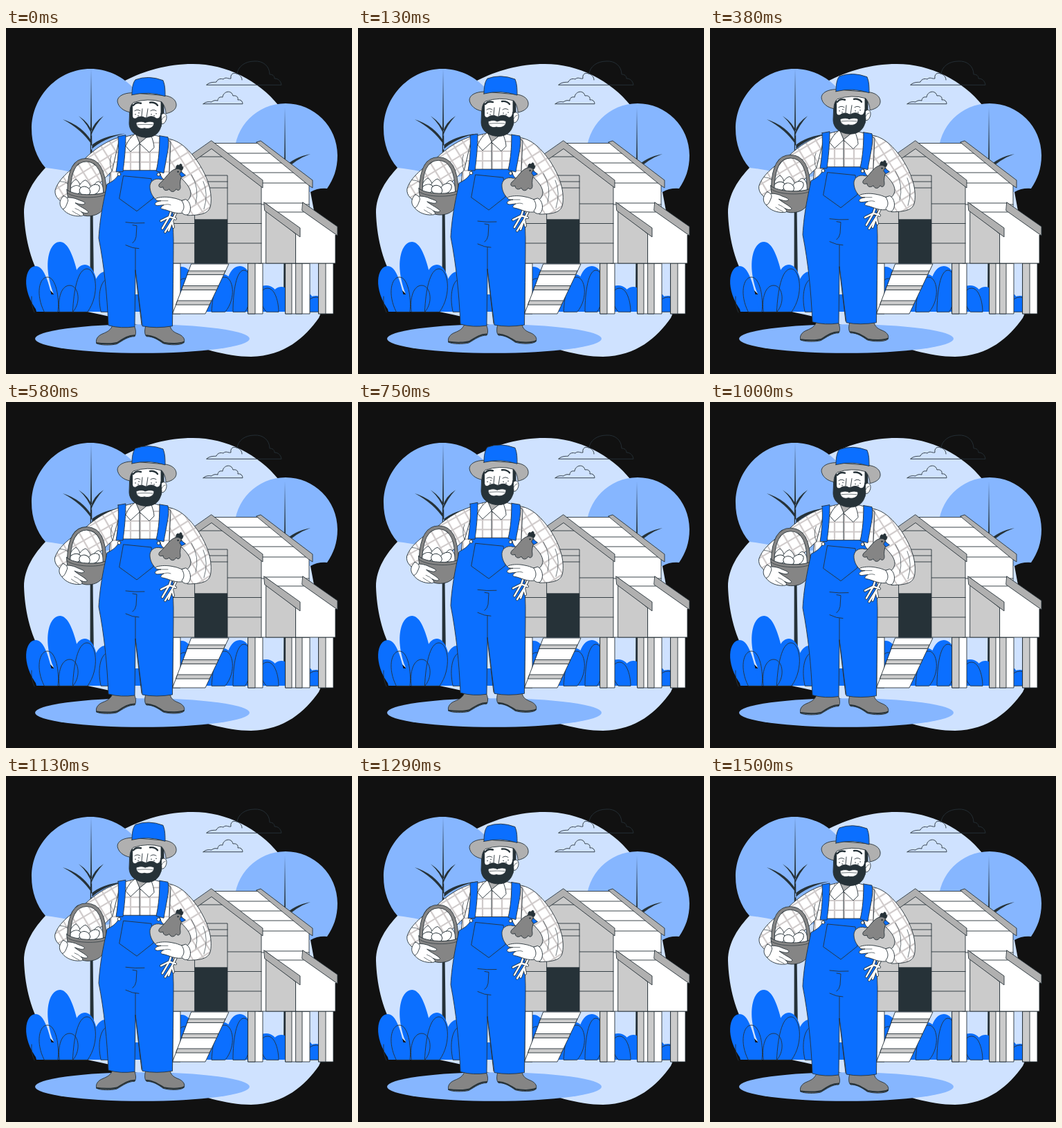
These frames come from a looping animation (500x500 px, 1540 ms). An HTML page:

```html
<!DOCTYPE html>
<html lang="en">
<head>
<meta charset="utf-8">
<title>Farmer</title>
<style>
  html, body { margin: 0; width: 100%; height: 100%; overflow: hidden; background: #111; }
  svg { display: block; width: 100vw; height: 100vh; }
  .o { stroke: #263238; stroke-width: .9; stroke-linejoin: round; stroke-linecap: round; }
  .n { fill: none; }
  .w { fill: #fff; }
  .b { fill: #0b6fff; }
  .m { fill: #86b6ff; }
  .g { fill: #cbcbcb; }
  .h { fill: #b0b0b0; }
  .s { fill: #858585; }
  .d { fill: #263238; }
  .thin { stroke-width: .65; }
</style>
</head>
<body>
<svg viewBox="0 0 500 500">
  <defs>
    <pattern id="plaid" width="14" height="14" patternUnits="userSpaceOnUse" x="5" y="5">
      <path d="M0 0H14V14H0Z" class="w"/>
      <path d="M0 7H14M7 0V14" stroke="#cfcaca" stroke-width="2.2"/>
    </pattern>
    <pattern id="plaidL" href="#plaid" patternTransform="rotate(-32)"/>
    <pattern id="plaidR" href="#plaid" patternTransform="rotate(58)"/>
    <path id="feet" d="M239 264L236 273L224 279M236 273L226 290M236 273L245 276M246 267L240 279L230 295M240 279L242 288M240 279L235 293"/>
    <path id="handle" d="M91 237C91 206 100 191 116 191C134 191 142 209 143 238"/>
  </defs>
  <path d="M0 0H500V500H0Z" fill="#111"/>

  <path fill="#cfe2ff" d="M57 202C42 218 26 240 26 267C27 298 34 335 52 364C72 394 98 406 122 411C160 418 200 431 240 447C278 462 318 475 354 475C403 474 432 447 452 419C464 398 464 330 448 280L440 237L448 200C430 165 412 137 394 112C365 76 319 52 270 52C232 52 200 62 172 76Z"/>

  <g id="trees">
    <path class="m" d="M122 59C168 59 207 98 207 145S168 222 122 214C100 210 80 204 57 202C44 187 37 167 37 146C37 98 76 59 122 59Z"/>
    <path class="m" d="M330 184C330 142 363 109 404 109S479 142 479 184C479 204 473 219 464 232Q450 231 440 237H330Z"/>
    <path class="d" d="M123 59L124.300 165L127.500 410H121.500L121.800 165Z M82 132Q110 141 124 164V169Q110 147 82 132Z M105 127Q121 138 124 150V156Q120 141 105 127Z M141 127Q126 137 123 150V156Q128 141 141 127Z M172 152.500Q139 156 123 170V176Q139 160 172 152.500Z"/>
    <path class="d" d="M403 115L404.200 205L405.500 410H401L402 205Z M440 182Q415 187 403 201V206Q418 190 440 182Z M374 178Q395 187 403 200V206Q393 189 374 178Z"/>
  </g>

  <g class="o n">
    <path d="M290 82.300H398C397 76 393 73 388 73C388 69 385 67 381 67C381 55 371 47 359 48C345 48 335 56 334 66M290 82C296 77 301 79 304 78C306 73 311 73 314 74C318 70 321 74 325 73C324 67 328 64 333 66C338 67 341 71 341 75"/>
    <path d="M285 109.700H342C342 106 339 103 335 104C336 100 333 97 328 98C326 89 314 91 313 100C309 99 306 101 306 105C302 104 299 105 297 107C292 106 288 107 285 109.700"/>
  </g>

  <g id="bush"></g>

  <g id="coop" class="o">
    <path class="w" d="M238 340H252V413H238Z"/><path class="g" d="M236 340H241V413H236Z"/>
    <path class="w" d="M350 340H371V413H350Z"/><path class="g" d="M350 340H360V413H350Z"/>
    <path class="w" d="M404 340H439V413H404Z"/><path class="g" d="M404 340H413V413H404ZM419 340H428V413H419Z"/>
    <path class="w" d="M452 340H473V413H452Z"/><path class="g" d="M452 340H462V413H452Z"/>
    <path class="w" d="M268 341H322L288 413H241Z"/>
    <path class="g" d="M264 351H317L314.500 356.500H262ZM256 372.500H307L304.500 378.500H254ZM248 394H297L294 400H246Z"/>
    <path class="w" d="M365 222H438V340H365Z"/><path class="n" d="M369 255H438"/>
    <path class="g" d="M230 216L297 170L369 224V340H230Z"/>
    <path class="n" d="M320 254H369M320 282.500H369M320 311H369M230 282.500H273M230 311H273M230 254H273M277 186H320"/>
    <path class="g" d="M273 213H320V277H273Z"/><path class="n" d="M273 222H320M273 231H320"/>
    <path class="d" d="M273 277H320V340H273Z"/>
    <path class="w" d="M297 166.500H366L441 224H371Z"/>
    <path class="n" d="M315 181H386M333 195H404M352 209H423"/>
    <path class="h" d="M362 165L368 163L443 220V231L437 227Z"/>
    <path class="h" d="M297 163L371 220V231L297 174.500L230 221V210Z"/>
    <path class="g" d="M376 262L419 298V340H376Z"/>
    <path class="w" d="M419 293H476V340H419Z"/>
    <path class="w" d="M375 253H430L478 289L425 291Z"/>
    <path class="w" d="M398 268L428 262L478 299H425V288Z" stroke="none"/>
    <path class="n" d="M392 266H430"/>
    <path class="h" d="M429 252L479 287V300L428 264Z"/>
    <path class="h" d="M373 252L425 289V302L374 264Z"/>
  </g>

  <ellipse class="m" cx="197" cy="449" rx="155" ry="20.800"/>

  <g id="man" class="o">
    <g id="shoes">
      <path class="s" d="M154 430C151 437 147 439 140 442C132 445 129 451 131 456C136 459 152 459 160 457C169 452 176 446 186 446C189 441 187 434 185 430Z"/>
      <path class="s" d="M202 430C200 437 200 443 203 446C213 446 220 451 227 456C236 459 253 459 257 455C260 449 254 444 248 442C241 439 238 436 237 430Z"/>
      <path class="n" style="stroke-width:2" d="M131 455.500C140 457 155 457 161 455C169 450 175 445 186 444.500M203 444.500C213 445 220 450 228 455C237 457 251 457 257 454"/>
    </g>

    <path fill="url(#plaidR)" d="M232 160C252 162 266 178 278 195C290 214 298 234 296 254C295 266 288 271 262 271L240 240L226 210Z"/>
    <path class="n thin" d="M285 222Q293 240 286 262M268 212Q280 232 274 254"/>
    <path fill="url(#plaid)" d="M186 154C174 157 164 159 154 167L149 230H235L238 165C230 158 220 157 211 154Z"/>

    <g id="arm">
      <path fill="url(#plaidL)" d="M164 158C146 163 128 175 113 190C96 203 76 217 71 235C70 245 78 251 90 257L106 240C122 240 138 222 153 207Z"/>
      <path class="n thin" d="M78 222Q92 222 99 235M153 207Q148 195 152 185"/>
      <g class="w">
        <path d="M90 238C92 228 96 221 101 219C106 222 109 230 110 240Z"/>
        <path d="M123 240C125 228 130 222 134 222C140 226 142 233 141 240Z"/>
        <path d="M102 241C102 230 110 221 115 220C121 224 125 232 124 242Z"/>
        <ellipse cx="100" cy="235" rx="9" ry="6.500" transform="rotate(-25 100 235)"/>
        <ellipse cx="127" cy="234" rx="9.500" ry="6.500" transform="rotate(-38 127 234)"/>
        <ellipse cx="114" cy="236" rx="8" ry="6.500" transform="rotate(20 114 236)"/>
      </g>
      <use href="#handle" class="n" style="stroke-width:5.500"/>
      <use href="#handle" class="n" style="stroke:#858585;stroke-width:3.900"/>
      <path class="s" d="M88 234C98 243 135 243 146 236C147 258 139 272 118 272C99 271 89 254 88 234Z"/>
      <path class="n thin" d="M89 239C99 247 136 247 146 240"/>
      <path class="w" d="M82 248C87 244 94 245 101 247C107 250 115 251 114 254C111 257 104 254 100 253C106 258 116 262 119 266C119 269 113 268 109 266C113 269 113 272 108 272C98 273 88 269 83 263C80 258 79 252 82 248Z"/>
      <path class="n thin" d="M100 261Q106 263 109 266M96 265Q102 269 107 271"/>
      <path class="w" d="M83 243C88 244 91 248 89 252C87 258 85 262 82 262C77 257 76 250 83 243Z"/>
    </g>

    <g id="overalls">
      <path class="b" d="M165 206H222C223 216 227 221 238 224C242 258 241 280 242 305C242 350 241 390 240.500 431Q217 435 197 431L187 350L186 432Q166 435 148 430C146 385 142 345 134 304C136 270 142 246 146 226C154 222 162 217 165 206Z"/>
      <path class="n" d="M170 214L210 218L213 246L189 265L164 247ZM173 281Q186 283 200 282M183 285L189 286L188 302Q187 308 183 311M173 314Q183 319 192 319M187 319V352L196 429"/>
      <path class="b" d="M162 157L173 155C173 175 171 192 169 208H159C162 190 163 174 162 157Z"/>
      <path class="b" d="M222 156L234 158C237 170 231 190 228 210L217 207C221 190 222 172 222 156Z"/>
      <circle class="w" cx="163.500" cy="211.500" r="2.300"/><circle class="w" cx="220.500" cy="212" r="2.300"/>
    </g>

    <g id="head">
      <path class="h" d="M188 148H209L208 160L194 169L186 157Z"/>
      <path class="w" d="M187 153C181 157 176 163 173 171L180 179L193 167ZM209 154C212 161 214 168 214 173L207 180L193 167Z"/>
      <path class="n" d="M193 168V206"/>
      <path class="d" d="M179 107H228V126L223 136H180Z"/>
      <path class="w" d="M183 103H224V143Q205 150 183 142Z"/>
      <path class="w" d="M225 125C230 121 234 127 231 134C229 139 225 140 223 138Z"/>
      <path class="n thin" d="M225 133Q227 128 230 128"/>
      <path class="d" d="M179 119L182 122C182 130 184 132 188 131C192 127 199 128 202 131C207 127 213 127 217 131C222 132 223 128 224 123L225 138C223 150 217 158 203 158.500C188 158 178 150 178 138Z"/>
      <path class="w" d="M188 137C193 135 198 135 201 137C206 135 211 135 214 137C214 144 207 147 200 145C194 147 188 144 188 137Z"/>
      <path class="n thin" d="M190 140Q201 139 212 140"/>
      <path class="n" d="M197 117L196 128Q199 131 203 130L205 117M186 120Q190 117 194 120M209 120Q213 117 217 120"/>
      <path class="n" style="stroke-width:2.400" d="M184 112Q188 107 195 109M208 108Q215 107 219 112"/>
      <path class="n" style="stroke-width:1.500" d="M187 125h.1M191 127h.1M192 123h.1M210 125h.1M214 127h.1M217 124h.1"/>
      <path class="h" d="M182 94C170 94 161 99 161 106C162 114 169 120 179 122C179 115 181 111 184 108Q205 101 225 107C229 112 231 118 231 124C241 122 247 117 246 110C245 103 238 99 230 98Z"/>
      <path class="b" d="M182 97C182 88 183 80 187 75Q206 68 227 76C230 83 230 91 230 99Q206 91 182 97Z"/>
    </g>

    <g id="hen">
      <use href="#feet" class="n" style="stroke-width:4"/>
      <use href="#feet" class="n" style="stroke:#fff;stroke-width:2.400"/>
      <path class="g" d="M224 219C214 216 207 223 208 231C209 243 218 254 236 256C252 258 266 252 267 240C267 232 261 225 254 218Z"/>
      <path class="d" d="M246 204C245 199 248 197 250 199C252 195 255 197 254 200C257 201 256 204 254 206Z"/>
      <path class="s" d="M245 204C251 202 256 207 254 213C252 219 251 224 252 230C252 235 248 236 246 233C243 238 238 238 236 233C231 237 227 234 227 230C222 232 219 229 222 225C230 219 236 206 245 204Z"/>
      <path class="b" d="M253 208L259.500 213L254 216L251 212Z"/>
      <circle class="d" cx="248.500" cy="208" r=".8"/>
      <path class="w" d="M262 250C255 252 250 247 242 246C234 244 225 244 218 246C214 248 217 250 224 250C218 251 214 253 216 256C218 258 224 256 228 256C224 258 222 261 226 262C235 263 244 271 260 267Z"/>
      <path class="n thin" d="M228 256Q234 254 238 256M224 250H234"/>
      <path class="w" d="M260 248C267 251 269 264 263 270C258 271 255 269 254 266C259 261 257 254 254 250Z"/>
    </g>
  </g>
</svg>
<script>
  // Leaf rooted on the ground line: centre, width, top, lean.
  const leaf = (x, w, top, lean) => {
    const h = 410 - top, c = x + lean;
    return `M${x - w * .4} 410C${c - w * .8} ${top + h * .5} ${c - w * .55} ${top} ${c} ${top}` +
      `S${c + w * .8} ${top + h * .6} ${x + w * .5} 410Z`;
  };
  const filled = [[57, 28, 344, -14], [97, 36, 309, -19], [114, 30, 342, 0], [134, 28, 352, 10],
    [165, 30, 350, 0], [225, 30, 350, 0], [256, 32, 345, -2], [284, 28, 362, 0], [308, 28, 356, 6],
    [334, 32, 344, 4], [376, 30, 372, 0], [394, 24, 374, 4], [420, 24, 362, 0], [448, 24, 387, 0]];
  const lined = [[64, 22, 360, -4], [86, 22, 372, 6], [106, 24, 348, 11], [146, 22, 362, 3],
    [252, 22, 362, 6], [306, 22, 360, 10], [336, 20, 350, 8], [384, 20, 376, -6], [442, 20, 389, 6]];
  const path = (list, cls) => `<path class="${cls}" d="${list.map(a => leaf(...a)).join('')}"/>`;
  document.getElementById('bush').innerHTML =
    '<path class="b" d="M44 410L38 385H440L460 410Z"/>' + path(filled, 'b') + path(lined, 'o n') +
    '<path class="o n" d="M41 411Q36 400 37 388"/>';

  // Linear bob of 10px over 1.5s, stepped at 24 pictures a second.
  const LOOP = 1540, STEPS = 37;
  const man = document.getElementById('man'), arm = document.getElementById('arm');
  const draw = () => {
    const n = Math.floor((performance.now() % LOOP + 4) * STEPS / LOOP) % STEPS;
    const up = Math.max(0, 1 - Math.abs((n + .5) / 18 - 1));
    man.setAttribute('transform', `translate(0 ${-10 * up})`);
    arm.setAttribute('transform', `rotate(${3 * up} 118 225)`);
    requestAnimationFrame(draw);
  };
  draw();
</script>
</body>
</html>
```
